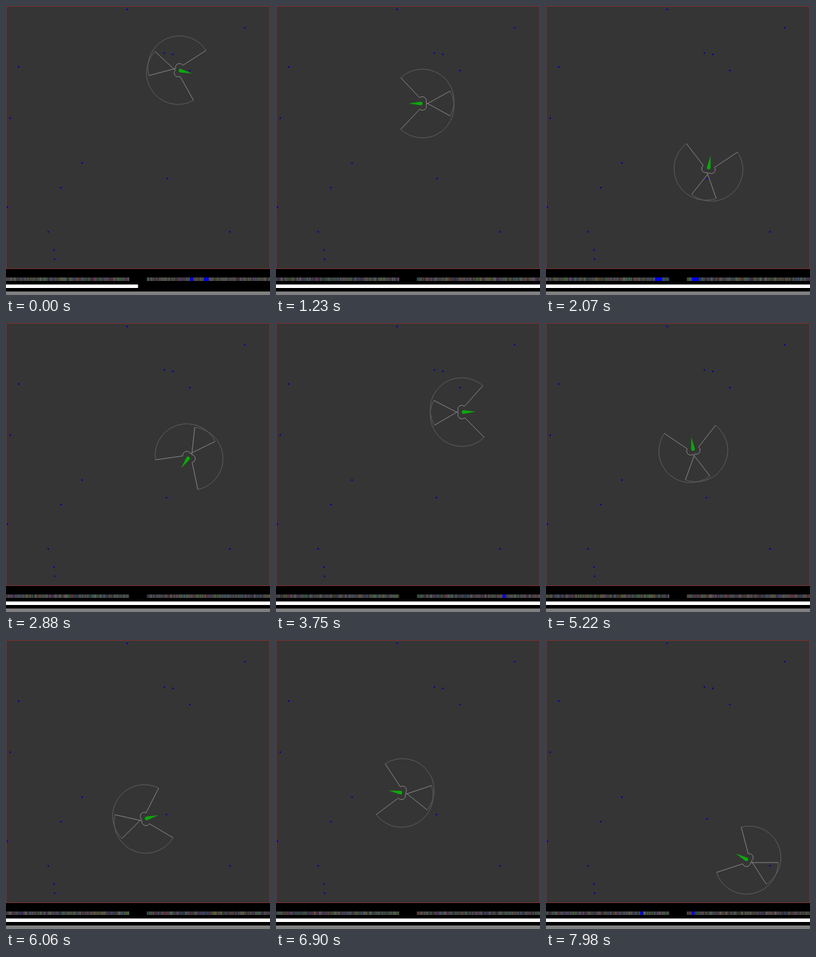
Recreate the animation shown at these times as an HTML page with a canvas. Size 375 by 412 pixels, loop 8 s.

```html
<!DOCTYPE html>
<html>
<head>
<meta charset="utf-8">
<style>
html, body { margin: 0; width: 100%; height: 100%; overflow: hidden; background: #000; }
canvas { display: block; }
</style>
</head>
<body>
<canvas id="stage" width="375" height="412"></canvas>
<script>
const ctx = document.getElementById('stage').getContext('2d');
const LOOP = 8000, STEP = 30, SPEED = 0.125;
const RAD = Math.PI / 180;
const EYE_GAP = 4, NEAR = 5.7, FAR = 45;
const FOV = 162 * RAD, OVERLAP = 28.8 * RAD;

// Route of the creature: time, x, y, heading in degrees
const route = [
  [0, 245.5, 91.5, 194],
  [1230, 208, 139, 0],
  [2150, 229, 243, 100],
  [2880, 260, 191, -55],
  [3750, 264, 127, 178.5],
  [5220, 209.3, 182, 81],
  [5880, 207, 243, 105],
  [6900, 179, 218, 10],
  [7380, 228, 250, 72],
  [8000, 289, 315, 27]
];

const food = [
  [172, 5], [339, 31], [18, 87], [6, 160], [225, 67], [237, 69], [261, 92],
  [108, 224], [78, 259], [2, 287], [60, 322], [68, 348], [69, 361], [318, 322]
];

const ramp = (t, from, to) => Math.min(1, Math.max(0, (t - from) / (to - from)));

function randomizer(seed) {
  let s = (seed * 7919 + 12345) >>> 0;
  return () => {
    s = (s + 0x6D2B79F5) >>> 0;
    let z = Math.imul(s ^ (s >>> 15), s | 1);
    z ^= z + Math.imul(z ^ (z >>> 7), z | 61);
    return ((z ^ (z >>> 14)) >>> 0) / 4294967296;
  };
}

// Cubic Hermite curve through the route, leaving each point along its heading
function poseAt(t) {
  let i = 0;
  while (i < route.length - 2 && t >= route[i + 1][0]) i++;
  const a = route[i], b = route[i + 1];
  const span = b[0] - a[0], u = (t - a[0]) / span, pull = SPEED * span;
  const curve = (p, q, m, n) => ({
    value: (2*u*u*u - 3*u*u + 1) * p + (u*u*u - 2*u*u + u) * m
         + (3*u*u - 2*u*u*u) * q + (u*u*u - u*u) * n,
    slope: (6*u*u - 6*u) * (p - q) + (3*u*u - 4*u + 1) * m + (3*u*u - 2*u) * n
  });
  const x = curve(a[1], b[1], pull * Math.cos(a[3] * RAD), pull * Math.cos(b[3] * RAD));
  const y = curve(a[2], b[2], pull * Math.sin(a[3] * RAD), pull * Math.sin(b[3] * RAD));
  return { x: x.value, y: y.value, heading: Math.atan2(y.slope, x.slope) };
}

// side: -1 for the left eye, 1 for the right eye
function eyeOf(pose, side) {
  return {
    x: pose.x - side * EYE_GAP * Math.sin(pose.heading),
    y: pose.y + side * EYE_GAP * Math.cos(pose.heading),
    start: pose.heading + (side < 0 ? OVERLAP - FOV : -OVERLAP)
  };
}

function drawEye({ x, y, start }) {
  const end = start + FOV;
  const arc = (radius, color) => {
    ctx.strokeStyle = color;
    ctx.beginPath();
    ctx.arc(x, y, radius, start, end);
    ctx.stroke();
  };
  arc(FAR, '#606060');
  arc(NEAR, '#8c8c8c');
  ctx.beginPath();
  for (const angle of [start, end]) {
    const c = Math.cos(angle), s = Math.sin(angle);
    ctx.moveTo(x + NEAR * c, y + NEAR * s);
    ctx.lineTo(x + FAR * c, y + FAR * s);
  }
  ctx.stroke();
}

function drawBody({ x, y, heading }) {
  ctx.save();
  ctx.translate(x, y);
  ctx.rotate(heading);
  ctx.fillStyle = '#0ca80c';
  ctx.beginPath();
  ctx.arc(-2.4, 0, 2.6, -Math.PI / 2 - 0.15, Math.PI / 2 + 0.15);
  ctx.lineTo(-19.5, 0);
  ctx.fill();
  ctx.restore();
}

function drawRetina(eye, left, dots, random) {
  for (let x = 0; x < 175; x += 1.75) {
    const channel = () => 45 + random() * 60 | 0;
    ctx.fillStyle = `rgb(${channel()},${channel()},${channel()})`;
    ctx.fillRect(left + x, 387, 1.75, 5);
  }
  ctx.fillStyle = '#0000f4';
  for (const [x, y] of dots) {
    const dx = x - eye.x, dy = y - eye.y, distance = Math.hypot(dx, dy);
    if (distance > FAR || distance < 1) continue;
    const turn = 2 * Math.PI;
    const angle = ((Math.atan2(dy, dx) - eye.start) % turn + turn) % turn;
    if (angle > FOV) continue;
    const half = Math.atan(1.1 / distance);
    const from = Math.max(0, (angle - half) / FOV * 175);
    const to = Math.min(175, (angle + half) / FOV * 175);
    ctx.fillRect(Math.round(left + from), 387, Math.max(1, Math.round(to - from)), 5);
  }
}

function draw(t) {
  const pose = poseAt(t);
  const left = eyeOf(pose, -1), right = eyeOf(pose, 1);
  const push1 = ramp(t, 2100, 2190), push2 = ramp(t, 7320, 7440);
  const dots = [...food, [229 - push1 + push2, 246 + 3 * push1 + 6 * push2]];
  const random = randomizer(t / STEP);

  ctx.fillStyle = '#000';
  ctx.fillRect(0, 0, 375, 412);
  ctx.fillStyle = '#353535';
  ctx.fillRect(0, 0, 375, 375);
  ctx.lineWidth = 1;
  ctx.strokeStyle = '#7a3030';
  ctx.strokeRect(0.5, 0.5, 374, 374);

  ctx.fillStyle = '#0000b4';
  for (const [x, y] of dots) {
    ctx.beginPath();
    ctx.arc(x, y, 1.15, 0, 2 * Math.PI);
    ctx.fill();
  }

  ctx.lineWidth = 0.9;
  drawEye(left);
  drawEye(right);
  drawBody(pose);

  drawRetina(left, 0, dots, random);
  drawRetina(right, 200, dots, random);
  ctx.fillStyle = '#fff';
  ctx.fillRect(0, 397, 187.5 * (1 + ramp(t, 0, 810)), 5);
  ctx.fillStyle = '#808080';
  ctx.fillRect(0, 407, 375, 5);
}

const began = performance.now();
function tick() {
  const t = (performance.now() - began) % LOOP;
  draw(Math.floor(t / STEP) * STEP);
  requestAnimationFrame(tick);
}
tick();
</script>
</body>
</html>
```
